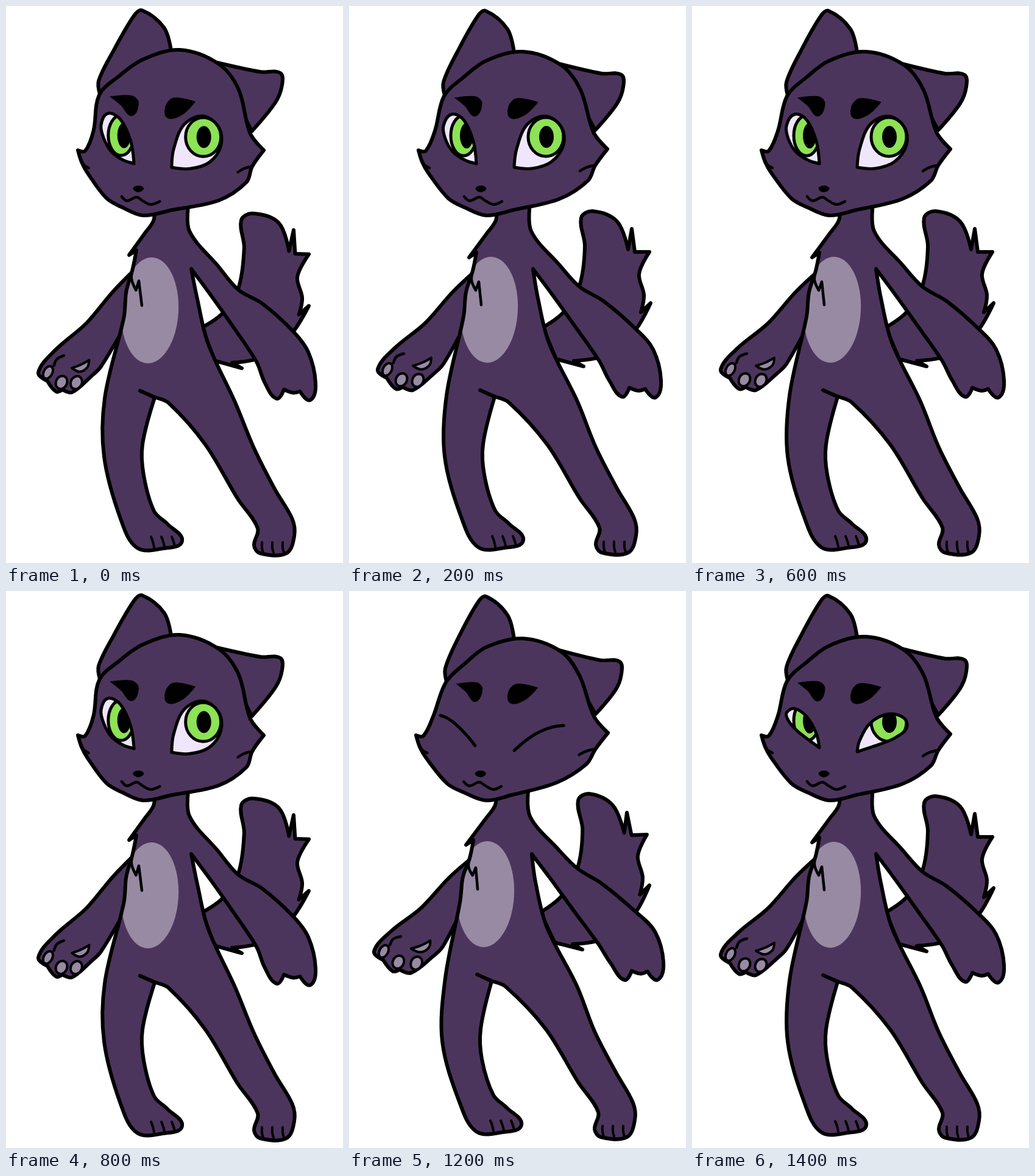
Recreate the animation shown at these times as an HTML page with a canvas. Size 553x915 px, loop 1600 ms.

```html
<!DOCTYPE html>
<html lang="en">
<head>
<meta charset="utf-8">
<title>Idle cat</title>
<style>
html, body { margin: 0; width: 100%; height: 100%; overflow: hidden; background: #fff; }
canvas { display: block; }
</style>
</head>
<body>
<canvas id="stage" width="553" height="915"></canvas>
<script>
const ctx = document.getElementById("stage").getContext("2d");
const FUR = "#4c355c", PALE = "#998aa4", WHITE = "#efe6fb", GREEN = "#8de255";

// Key points of the middle pose, "x,y"; a trailing "!" makes a sharp corner.
const tail = "318,528! 352,503 378,460 387,395 381,348 400,337 440,354 458,400! 464,366! 469,404! 493,404! 476,440 484,475 479,503! 495,488! 468,535 420,574 369,583! 385,592! 340,580!";
const paw = "215,428! 170,470 125,521 75,562 47,597 62,611! 77,629 88,626! 105,631 138,605 155,588 195,515!";
const arm = "297,325! 299,370 345,425 378,461 418,485 470,530 499,564 512,615 503,643 486,629! 475,632 460,627! 448,642 427,615 410,582 370,525 332,472 302,432!";
const legs = "310,480 328,553 375,650 405,725 440,793 468,842 471,870 458,898 415,898 405,885 411,857 378,808 325,720 262,651 238,641 215,631! 239,642! 220,720 222,770 240,829 262,850 286,878 255,890 212,889 185,842 157,740 160,640 188,510 192,470 203,435 209,405! 197,413! 225,375 241,352 242,330!";
const head = "114,237! 126,238 141,205 156,148 188,117 225,90 285,75 348,97 380,138 401,207 424,235! 404,262 392,287 345,317 270,335 225,344 190,331 163,316 130,274 120,256";
const ears = ["157,147! 155,125 178,75 211,17 224,8 260,38 271,77!", "345,95! 415,111 447,113 450,133 440,160 404,204!"];
const brows = ["174,151! 208,149 218,160 207,181 190,164", "262,165 275,152 310,158! 290,178 265,184"];

// Each pin drags its neighbourhood by (dx, dy) as the sway goes from 0 to 1.
const pins = [
  [222, 8, 1, 1], [156, 135, 3, 2], [285, 75, 0, 3], [452, 115, -3, 3],
  [114, 237, -4, 0], [424, 233, 1, -2], [225, 335, 0, 0], [260, 215, 0, 0],
  [268, 350, -3, 0], [197, 413, -5, 4], [320, 395, -1, 1], [378, 460, -3, -5],
  [48, 600, -6, -5], [150, 597, -1, -4], [130, 515, -7, 0], [230, 500, -6, -1],
  [315, 515, -4, 0], [238, 642, -5, -1], [188, 740, -4, 0], [240, 875, -3, -1],
  [438, 885, -2, -1], [370, 700, -2, 0], [512, 605, 4, -5], [448, 640, 4, -3],
  [381, 345, -5, -4], [464, 365, -8, -2], [494, 445, -2, -5], [375, 588, -2, -3]
];
let sway = 0;

function warp(x, y) {
  let sx = 0, sy = 0, sum = 0;
  for (const [px, py, dx, dy] of pins) {
    const w = (Math.hypot(x - px, y - py) + 1) ** -3;
    sx += w * dx;
    sy += w * dy;
    sum += w;
  }
  return [x + sway * sx / sum, y + sway * sy / sum];
}

const parse = text => text.split(" ").map(s => [...s.split(",").map(parseFloat), s.endsWith("!")]);

// Smooth path through the points, bent by the warp.
function curve(shape, open) {
  const pts = (typeof shape === "string" ? parse(shape) : shape).map(([x, y, c]) => [...warp(x, y), c]);
  const n = pts.length, path = new Path2D();
  const slope = i => {
    if (pts[i][2] || (open && (i === 0 || i === n - 1))) return [0, 0];
    const a = pts[(i + n - 1) % n], b = pts[(i + 1) % n];
    const d = Math.hypot(b[0] - a[0], b[1] - a[1]) || 1;
    return [(b[0] - a[0]) / d, (b[1] - a[1]) / d];
  };
  path.moveTo(pts[0][0], pts[0][1]);
  for (let i = 0; i < (open ? n - 1 : n); i++) {
    const j = (i + 1) % n, [ax, ay] = pts[i], [bx, by] = pts[j];
    const [ux, uy] = slope(i), [vx, vy] = slope(j);
    const k = Math.hypot(bx - ax, by - ay) / 3;
    path.bezierCurveTo(ax + ux * k, ay + uy * k, bx - vx * k, by - vy * k, bx, by);
  }
  if (!open) path.closePath();
  return path;
}

function oval(x, y, rx, ry, turn = 0) {
  const path = new Path2D();
  path.ellipse(...warp(x, y), rx, ry, turn, 0, 7);
  return path;
}

function paint(path, fill, width) {
  if (fill) {
    ctx.fillStyle = fill;
    ctx.fill(path);
  }
  if (width) {
    ctx.lineWidth = width;
    ctx.stroke(path);
  }
}

const line = (shape, width = 4.5) => paint(curve(shape, true), null, width);

function inside(path, draw) {
  ctx.save();
  ctx.clip(path);
  draw();
  ctx.restore();
}

// seam(x) is the height of the closed lid; "from" and "to" are its ends.
const eyes = [
  {
    lid: "155,197 168,178 188,187 204,222 209,259! 190,253 170,239 158,218",
    from: 152, to: 208,
    seam: x => 204 + 50 * Math.max(0, (x - 152) / 56) ** 1.5,
    iris: [188, 213, 21, 33], pupil: [193, 213, 11, 21]
  },
  {
    lid: "271,265! 275,235 292,195 322,181 348,198 352,228 332,256 300,267",
    from: 272, to: 353,
    seam: x => 222 + 40 * ((353 - x) / 81) ** 2,
    iris: [323, 215, 29, 32], pupil: [324, 215, 12, 18]
  }
];

function drawEye(eye, shut) {
  if (shut === 1) {
    const pts = [];
    for (let i = 0; i <= 6; i++) {
      const x = eye.from + (eye.to - eye.from) * i / 6;
      pts.push([x, eye.seam(x)]);
    }
    return line(pts, 5);
  }
  const lid = curve(parse(eye.lid).map(([x, y, c]) => [x, y + (eye.seam(x) - y) * shut, c]));
  paint(lid, WHITE);
  inside(lid, () => {
    paint(oval(...eye.iris), GREEN, 5);
    paint(oval(...eye.pupil), "#000");
  });
  paint(lid, null, 5);
}

function drawPaw() {
  paint(curve(paw), FUR, 6);
  line("90,571 78,576 73,586");
  paint(oval(63, 597, 7, 11, .5), PALE, 4);
  paint(oval(86, 614, 9, 11, .5), PALE, 4);
  paint(oval(113, 615, 9, 11, .5), PALE, 4);
  paint(curve("105,591! 120,586 135,578! 132,590 119,597"), PALE, 4);
}

function drawBody() {
  const body = curve(arm + " " + legs);
  paint(body, FUR);
  inside(body, () => paint(oval(230, 499, 47, 87, .05), PALE));
  paint(body, null, 6);
  line("204,431 201,450 208,467! 213,453! 217,491");
  for (let i = 0; i < 3; i++) {
    const x = 235 + 17 * i, r = 418 + 17 * i;
    line(`${x},871 ${x + 3},879 ${x + 5},${888 - i}`, 4);
    line(`${r},880 ${r},889 ${r + 2},897`, 4);
  }
}

function drawHead(shut) {
  for (const ear of ears) paint(curve(ear), FUR, 6);
  paint(curve(head), FUR, 6);
  line("402,262 390,265 379,271");
  line("119,252 124,261 132,266");
  for (const eye of eyes) drawEye(eye, shut);
  for (const brow of brows) paint(curve(brow), "#000", 1);
  paint(curve("210,299 216,304 223,299"), "#000", 4);
  line("189,313 198,320 214,314 224,320 237,326 251,321");
}

// Sway out and back twice per loop, blinking on the second pass.
const blink = [0, 0, 0, 0, 0, .45, 1, .45];
let shown = -1;

function tick() {
  const step = Math.floor(performance.now() % 1600 / 200);
  if (step !== shown) {
    shown = step;
    sway = -Math.cos(step * Math.PI / 2);
    ctx.clearRect(0, 0, 553, 915);
    paint(curve(tail), FUR, 6);
    drawPaw();
    drawBody();
    drawHead(blink[step]);
  }
  requestAnimationFrame(tick);
}

ctx.lineCap = ctx.lineJoin = "round";
tick();
</script>
</body>
</html>
```
